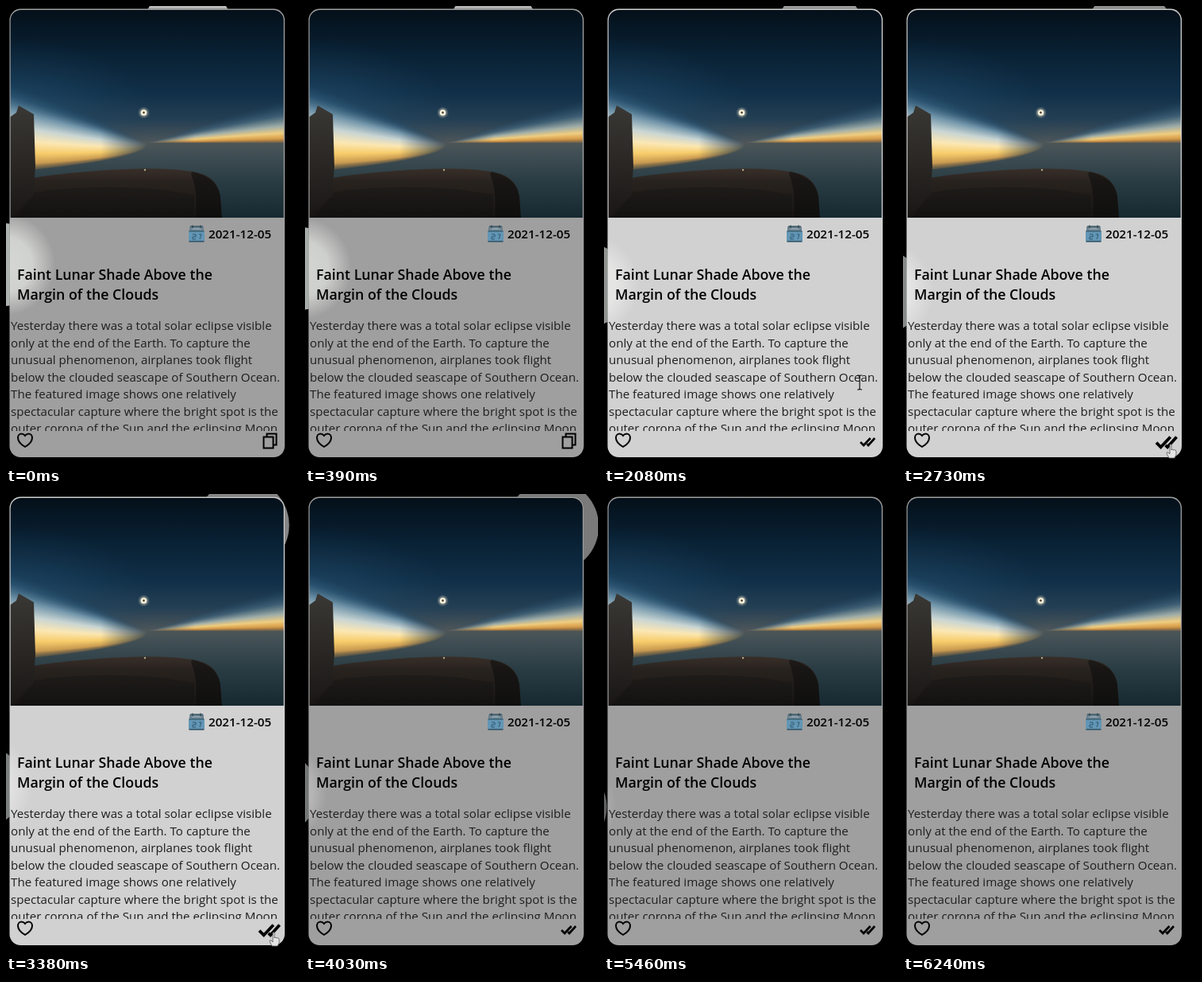
Animation, 369 px wide and 578 px high, one loop 6.37 s. Source, as an HTML page with a canvas:

```html
<!DOCTYPE html>
<html lang="en">
<head>
<meta charset="utf-8">
<title>Picture card</title>
<style>
html, body { margin: 0; width: 100%; height: 100%; overflow: hidden; background: #000; }
#stage { position: relative; width: 369px; height: 578px; overflow: hidden; font-family: "Open Sans", "Noto Sans", sans-serif; color: #000; }
canvas { position: absolute; left: 0; top: 0; }
.text { position: absolute; white-space: pre; overflow: hidden; }
#date { left: 255px; top: 276.4px; font: 600 15.2px/20px "Open Sans", "Noto Sans", sans-serif; }
#title { left: 14px; top: 324.6px; font: 600 17.8px/25.5px "Open Sans", "Noto Sans", sans-serif; }
#body { left: 6px; top: 391.4px; width: 344px; height: 142.6px; font-size: 15.15px; line-height: 21.5px; color: #1e1e1e; }
</style>
</head>
<body>
<div id="stage">
<canvas id="view" width="369" height="578"></canvas>
<div class="text" id="date">2021-12-05</div>
<div class="text" id="title">Faint Lunar Shade Above the
Margin of the Clouds</div>
<div class="text" id="body">Yesterday there was a total solar eclipse visible
only at the end of the Earth. To capture the
unusual phenomenon, airplanes took flight
below the clouded seascape of Southern Ocean.
The featured image shows one relatively
spectacular capture where the bright spot is the
outer corona of the Sun and the eclipsing Moon</div>
</div>
<script>
const W = 369, H = 578, LOOP = 6370, STEP = 130;
const g = document.getElementById('view').getContext('2d');

// Pointer tracks: [time, x, y]; the pointer is absent outside them
const tracks = [
  [[520, 340, 470], [780, 337, 548], [1560, 337, 548], [2080, 322, 473],
   [2210, 322, 473], [2730, 337, 551], [4030, 337, 551]],
  [[4420, 345, 60], [4680, 298, 79], [4810, 298, 79], [5070, 349, 75]]
];
const COPIED = 1300, ORB_END = 4290;

function pointerAt(t) {
  for (const track of tracks) {
    for (let i = 1; i < track.length; i++) {
      const [t0, x0, y0] = track[i - 1], [t1, x1, y1] = track[i];
      if (t >= t0 && t < t1) {
        const k = (t - t0) / (t1 - t0);
        return { x: x0 + (x1 - x0) * k, y: y0 + (y1 - y0) * k };
      }
    }
  }
  return null;
}

function ramp(gradient, stops) {
  stops.forEach(([at, color]) => gradient.addColorStop(at, color));
  return gradient;
}

function vertical(c, y0, y1, stops) {
  return ramp(c.createLinearGradient(0, y0, 0, y1), stops);
}

function disc(c, x, y, r, color) {
  c.fillStyle = color;
  c.beginPath();
  c.arc(x, y, r, 0, Math.PI * 2);
  c.fill();
}

function glow(c, x, y, rx, ry, stops) {
  c.save();
  c.translate(x, y);
  c.scale(rx, ry);
  disc(c, 0, 0, 1, ramp(c.createRadialGradient(0, 0, 0, 0, 0, 1), stops));
  c.restore();
}

function shape(c, d, fill) {
  c.fillStyle = fill;
  c.fill(new Path2D(d));
}

function line(d, width, color = '#000') {
  g.strokeStyle = color;
  g.lineWidth = width;
  g.stroke(new Path2D(d));
}

// Dawn light fans out to both sides from one point on the horizon
function dawn(c) {
  const hub = 178;
  const west = [[0, 'rgba(30,70,102,0)'], [.14, 'rgba(48,90,120,.6)'], [.3, '#6f93a8'],
    [.48, '#c9d5d3'], [.64, '#fbe7b4'], [.79, '#f7cd6c'], [.92, '#c99a50'], [1, 'rgba(120,98,66,.5)']];
  const east = [[0, 'rgba(30,70,102,0)'], [.35, 'rgba(66,100,122,.8)'], [.6, '#9fada8'],
    [.77, '#efcd80'], [.9, '#d89c48'], [1, '#6a5a48']];
  for (let x = 0; x < W; x++) {
    const k = Math.abs(x - hub) / hub;
    const isWest = x < hub;
    const top = 172 - (isWest ? 77 : 56) * k ** .9;
    const bottom = 172 + (isWest ? 37 * k ** .45 : 0);
    c.globalAlpha = Math.min(1, k * 3);
    c.fillStyle = vertical(c, top, bottom, isWest ? west : east);
    c.fillRect(x, top, 1, bottom - top);
  }
  c.globalAlpha = 1;
}

function makePhoto() {
  const canvas = document.createElement('canvas');
  canvas.width = W;
  canvas.height = 267;
  const c = canvas.getContext('2d');
  c.fillStyle = vertical(c, 5, 173, [[0, '#04101a'], [.33, '#092134'], [.62, '#102f48'],
    [.82, '#243f53'], [1, '#50575a']]);
  c.fillRect(0, 0, W, 267);
  glow(c, 0, 140, 190, 100, [[0, 'rgba(50,98,130,.6)'], [1, 'rgba(30,70,102,0)']]);

  shape(c, 'M0 173 L369 171 V267 H0Z',
    vertical(c, 171, 266, [[0, '#4d5658'], [.15, '#414f55'], [.5, '#2b3d44'], [1, '#172930']]));
  dawn(c);

  glow(c, 173.5, 134, 8, 8, [[0, 'rgba(255,255,240,.8)'], [.5, 'rgba(215,210,190,.6)'],
    [1, 'rgba(90,100,110,0)']]);
  disc(c, 173.5, 134, 3.6, '#fff7df');
  disc(c, 173.5, 134, 1.4, '#4b453d');

  shape(c, 'M34 216 Q85 208 150 205 Q215 202 247 211 Q267 218 270 240 L272 267 H0 V246Z',
    vertical(c, 204, 266, [[0, '#392f29'], [.25, '#29231f'], [1, '#161412']]));
  shape(c, 'M235 208 Q267 216 270 240 L272 267 H239 Q242 232 233 211Z', 'rgba(9,10,11,.5)');
  shape(c, 'M36 234 Q105 224 190 230 L237 237 V267 H10Z', 'rgba(8,9,10,.22)');
  shape(c, 'M0 143 L13 134 L16 125 L35 136 L37 202 L34 239 L0 267Z',
    vertical(c, 125, 266, [[0, '#393835'], [.5, '#2a2724'], [1, '#191716']]));
  disc(c, 175, 206, 1.2, '#b9a78d');
  return canvas;
}

const photo = makePhoto();

function roundBox(x, y, w, h, r) {
  g.beginPath();
  g.roundRect(x, y, w, h, r);
}

function calendar() {
  g.fillStyle = '#6c808c';
  roundBox(231, 276.5, 18, 8, 2);
  g.fill();
  g.fillStyle = '#6296b5';
  roundBox(230, 282, 20, 14.5, 2);
  g.fill();
  line('M230.5 283 H249.5 M230.5 295.8 H249.5 M232 277 H248 M235 275.5 V280 M245 275.5 V280', 1.2, '#2a4452');
  line('M234 280 H246', 1, '#a9c0cc');
  line('M235 287 H239 V290 H235 V293 H239 M243 287 H246 L244 293', 1, '#315970');
}

function heart() {
  g.save();
  g.translate(12, 533.5);
  line('M16.5 4 C19 4 21 6 21 9 C21 15 14.5 19 12 20.4 C9.5 19 3 15 3 9 C3 6 5 4 7.5 4 C9.4 4 11 5 12 6.3 C13 5 14.6 4 16.5 4Z', 2);
  g.restore();
}

function actionIcon(copied, big) {
  g.save();
  g.translate(332.5, 546.5);
  if (big) g.scale(1.42, 1.42);
  if (copied) line('M-9.5 1.5 L-5.5 5.5 L3 -3.5 M-1.3 3.8 L.4 5.5 L8.5 -3.5', 2.7);
  else line('M-8 -5 H4 V9 H-8Z M-4 -5 V-9 H8 V5 H4', 2);
  g.restore();
}

function pointer(p) {
  g.save();
  g.translate(Math.round(p.x), Math.round(p.y));
  if (p.y > 534) {
    const hand = 'M-1 0 Q1 -1 1 1 V7 L2 6 L4 7 L5 6.5 L7 8 V13 L5 17 H-2 L-5 11 Q-5 9 -3 10 L-1 12Z';
    shape(g, hand, '#e4e4e4');
    line(hand, .8, '#555');
  } else if (p.y > 390) {
    line('M-3 -9 H-1 L0 -8 L1 -9 H3 M0 -8 V8 M-3 9 H-1 L0 8 L1 9 H3', 1.2, '#111');
  } else {
    const arrow = 'M0 0 V10 L2.3 8 L4 12 L5.5 11.3 L4 7.5 H7Z';
    shape(g, arrow, '#11161a');
    line(arrow, .8, '#cbd0d3');
  }
  g.restore();
}

function draw(t) {
  const p = pointerAt(t);
  const shade = p ? .82 : .624;
  const overIcon = p && p.y > 534;
  const fade = .72 - .00006 * t;
  const left = { x: -2 - .0085 * t, y: 325 + .0125 * t };

  g.fillStyle = '#000';
  g.fillRect(0, 0, W, H);
  if (t < ORB_END) disc(g, 229 + .0206 * t, 32.5 + .002 * t, 58, `rgba(255,255,255,${fade})`);
  disc(g, left.x, left.y, 52, `rgba(240,248,244,${fade})`);

  g.save();
  roundBox(4.5, 3.6, 346.5, 563.4, 14);
  g.clip();
  g.fillStyle = '#000';
  g.fillRect(0, 0, W, H);
  glow(g, left.x, left.y, 64, 64, [[0, `rgba(240,248,235,${fade * .85})`],
    [.55, `rgba(240,248,235,${fade * .75})`], [1, 'rgba(240,248,235,0)']]);
  g.fillStyle = `rgba(255,255,255,${shade})`;
  g.fillRect(0, 0, W, H);
  g.restore();

  g.save();
  roundBox(5.7, 5, 344, 261, [13, 13, 0, 0]);
  g.clip();
  g.drawImage(photo, 0, 0);
  g.restore();

  calendar();
  heart();
  actionIcon(t >= COPIED, overIcon);
  if (p) pointer(p);
}

const start = performance.now();
function frame() {
  const t = (performance.now() - start) % LOOP;
  draw(Math.floor(t / STEP) * STEP);
  requestAnimationFrame(frame);
}
frame();
</script>
</body>
</html>
```
